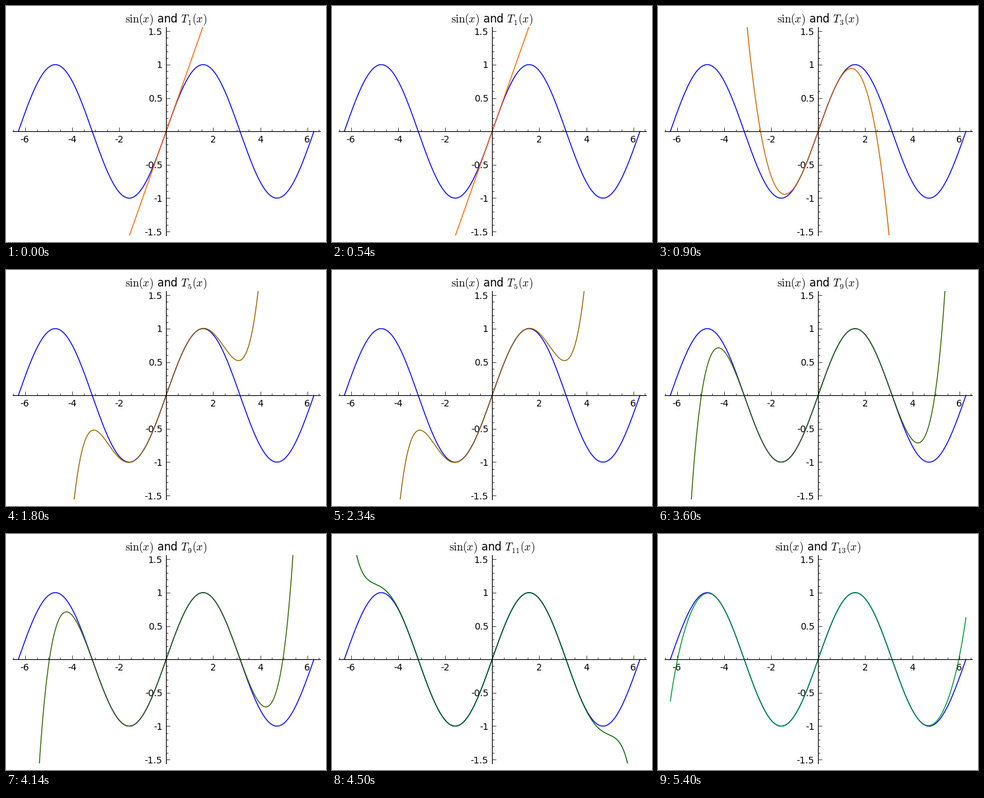
Recreate the animation shown at these times as a matplotlib script. Size 484 by 358 pixels, loop 6.3 s.

```python
from math import factorial

import matplotlib.pyplot as plt
import numpy as np
from matplotlib.animation import FuncAnimation
from matplotlib.ticker import AutoMinorLocator, FuncFormatter, MultipleLocator

W, H, DPI = 484, 358, 100
COLORS = ["#ff6600", "#cc6600", "#996600", "#666600",
          "#336600", "#006600", "#009933"]

plt.rcParams.update({
    "font.family": "DejaVu Sans",
    "font.size": 10,
    "mathtext.fontset": "cm",
})


def taylor_sin(x, degree):
    """Taylor polynomial of sin around 0, up to the given odd degree."""
    return sum((-1) ** (n // 2) * x ** n / factorial(n)
               for n in range(1, degree + 1, 2))


def style_axis(axis, step, divisions):
    axis.set_major_locator(MultipleLocator(step))
    axis.set_minor_locator(AutoMinorLocator(divisions))
    axis.set_major_formatter(
        FuncFormatter(lambda v, _: f"{v:g}" if abs(v) > 1e-9 else ""))


fig = plt.figure(figsize=(W / DPI, H / DPI), dpi=DPI, facecolor="white")
ax = fig.add_axes([9.7 / W, 9.8 / H, 465 / W, 316 / H])
ax.patch.set_visible(False)
ax.set_xlim(-2.08 * np.pi, 2.08 * np.pi)
ax.set_ylim(-1.56, 1.56)

# Axes cross at the origin, ticks point up and right
for side in ("left", "bottom"):
    ax.spines[side].set_position("zero")
    ax.spines[side].set_linewidth(0.8)
for side in ("right", "top"):
    ax.spines[side].set_visible(False)
ax.tick_params(which="major", direction="in", length=4, width=0.5, pad=4)
ax.tick_params(which="minor", direction="in", length=2, width=0.5)
style_axis(ax.xaxis, 2, 4)
style_axis(ax.yaxis, 0.5, 5)

x = np.linspace(-2 * np.pi, 2 * np.pi, 601)
ax.plot(x, np.sin(x), color="#0000ff", lw=1)
poly, = ax.plot([], [], lw=1)
title = ax.set_title("", fontsize=12, y=1.0, pad=5)


def draw(i):
    degree = 2 * i + 1
    poly.set_data(x, taylor_sin(x, degree))
    poly.set_color(COLORS[i])
    # The thin-space superscript lowers the subscript a little
    title.set_text(rf"$\sin(x)$ and $T^{{\,}}_{{{degree}}}(x)$")
    return poly, title


anim = FuncAnimation(fig, draw, frames=len(COLORS), interval=900,
                     repeat=True, repeat_delay=0, blit=False)
plt.show()
```
